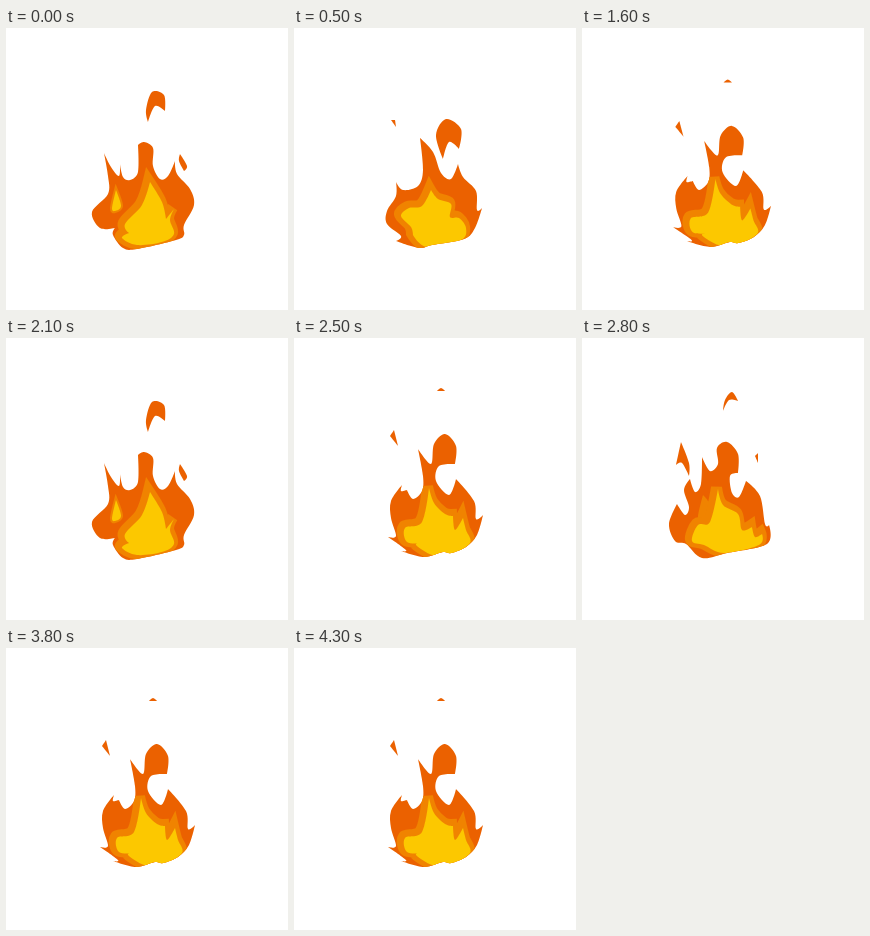
Recreate the animation shown at these times as an HTML page with a canvas. Size 282 by 282 pixels, loop 4400 ms.

```html
<!DOCTYPE html>
<html lang="en">
<head>
<meta charset="utf-8">
<title>Flame</title>
<style>
html, body { margin: 0; width: 100%; height: 100%; overflow: hidden; background: #fff; }
canvas { display: block; width: 282px; height: 282px; }
</style>
</head>
<body>
<canvas id="stage"></canvas>
<script>
const SIZE = 282, STEP = 100, LOOP = 4400, RUN = 13;
const OUTER = '#eb6100', MID = '#f08300', CORE = '#fcc800';

// Outlines are x,y points; "!" marks a sharp tip, all others are smooth.
const wide = {
  body: '98,125! 105,139 113,148 114,136! 117,149 124,152 132,144 132,117! 138,114 147,120 147,138 154,151 162,148 169,133! 171,146 184,161 188,177 178,197 178,207 170,212 131,221 117,220 107,207 109,200! 94,200 86,184 102,166 102,148',
  bits: ['142,94! 140,82 146,64 158,67 159,83! 149,78', '174,126! 181,138 178,143! 173,133'],
  core: ['144,154! 156,174 160,191! 168,181! 164,192 168,206 156,214 131,217 116,210 123,205! 119,196 136,177', '110,162! 115,178 109,183 106,180']
};
const forked = {
  body: '95,166! 103,177 107,169 102,152 108,141! 113,154 119,146 120,119! 128,133 136,126 135,110 145,104 156,116 156,135! 148,138 150,155 157,159 164,143! 178,158 183,186 187,187! 185,206 145,215 120,220 104,206 93,203 87,186',
  bits: ['141,73! 143,62 150,54 156,63! 147,62', '99,104! 107,125 107,138! 100,125 94,127!', '173,118! 176,115! 176,125!'],
  core: ['136,151! 141,167 156,176 160,192 170,189! 173,199 180,196! 177,207 142,215 122,207 110,203 116,187 128,184'],
  lick: '121,157! 130,172 118,190! 116,178'
};
const hooked = {
  body: '108,147! 107,153 113,152! 119,161 128,153 129,138 124,111! 137,126 140,106 151,96 162,108 161,126! 145,128 142,143 155,157 162,141! 180,163 182,181 189,177! 183,197 172,209 157,215 149,214 130,219 107,213! 112,212 94,199! 102,198 97,180 97,163',
  bits: ['143,53! 147,50 151,53!', '100,92! 104,108! 96,98!'],
  core: ['135,150! 140,165 151,176 159,178! 161,192 169,180! 172,192 176,205 157,217 149,214 138,217 122,207 129,205! 113,204 111,190 128,184']
};
const split = {
  body: '102,154! 109,162 124,158 129,142 126,110! 139,124 147,145 157,151 164,136! 169,149 182,163 183,182 188,180! 181,200 170,211 138,217 125,220 102,213! 107,208 93,196 93,183 102,168',
  bits: ['142,107 152,91 167,101 165,121! 155,114 149,131!', '97,92! 101,92! 102,99!'],
  core: ['137,162! 144,171 157,176 156,189 165,190 172,200 167,212 133,219 119,207! 117,199 107,188 115,180 128,178']
};

// Closed Catmull-Rom curve with flat tangents at the tips.
function outline(text, warp) {
  const pts = text.split(' ').map(word => {
    const [x, y] = word.replace('!', '').split(',').map(Number);
    return { ...warp(x, y), tip: word.endsWith('!') };
  });
  const n = pts.length;
  const at = i => pts[(i + n) % n];
  const slope = i => at(i).tip ? [0, 0]
    : [(at(i + 1).x - at(i - 1).x) / 6, (at(i + 1).y - at(i - 1).y) / 6];
  const path = new Path2D();
  path.moveTo(pts[0].x, pts[0].y);
  for (let i = 0; i < n; i++) {
    const a = at(i), b = at(i + 1);
    const [ax, ay] = slope(i), [bx, by] = slope(i + 1);
    path.bezierCurveTo(a.x + ax, a.y + ay, b.x - bx, b.y - by, b.x, b.y);
  }
  path.closePath();
  return path;
}

// In-between poses stretch a shape from its base; loose bits rise on their own.
function pose(shape, sx = 1, sy = 1, rise = 0) {
  const warp = lift => (x, y) => ({ x: 188 - (188 - x) * sx, y: 221 - (221 - y) * sy - lift });
  const trace = (list, lift = 0) => list.map(text => outline(text, warp(lift)));
  return {
    body: trace([shape.body])[0],
    bits: trace(shape.bits, rise),
    core: trace(shape.core),
    lick: trace(shape.lick ? [shape.lick] : [])
  };
}

const poses = [
  pose(wide),
  pose(wide, 1, 1.03),
  pose(forked),
  pose(hooked, 1.03, 0.985, 1),
  pose(hooked),
  pose(split),
  pose(split, 1.04, 0.99, 10),
  pose(wide, 1.04, 0.98, -7)
];

const canvas = document.getElementById('stage');
const ctx = canvas.getContext('2d');
const ratio = window.devicePixelRatio || 1;
canvas.width = canvas.height = Math.round(SIZE * ratio);
ctx.scale(ratio, ratio);
ctx.lineWidth = 11;
ctx.lineJoin = 'miter';
ctx.miterLimit = 4;

function fill(color, paths) {
  ctx.fillStyle = color;
  paths.forEach(path => ctx.fill(path));
}

function draw(ms) {
  const tick = Math.floor((ms % LOOP) / STEP);
  const { body, bits, core, lick } = poses[(tick % RUN) % poses.length];
  ctx.fillStyle = '#fff';
  ctx.fillRect(0, 0, SIZE, SIZE);
  fill(OUTER, [body, ...bits]);

  ctx.save();
  ctx.clip(body);
  fill(MID, lick);
  // The middle tone is a band around the core, leaning up and left.
  ctx.save();
  ctx.translate(-1.5, -1.5);
  ctx.strokeStyle = MID;
  ctx.stroke(core[0]);
  ctx.restore();
  ctx.lineWidth = 4;
  ctx.strokeStyle = MID;
  core.slice(1).forEach(path => ctx.stroke(path));
  fill(CORE, core);
  ctx.restore();
}

let start = null;
function frame(now) {
  if (start === null) start = now;
  draw(Math.max(0, now - start));
  requestAnimationFrame(frame);
}
draw(0);
requestAnimationFrame(frame);
</script>
</body>
</html>
```
